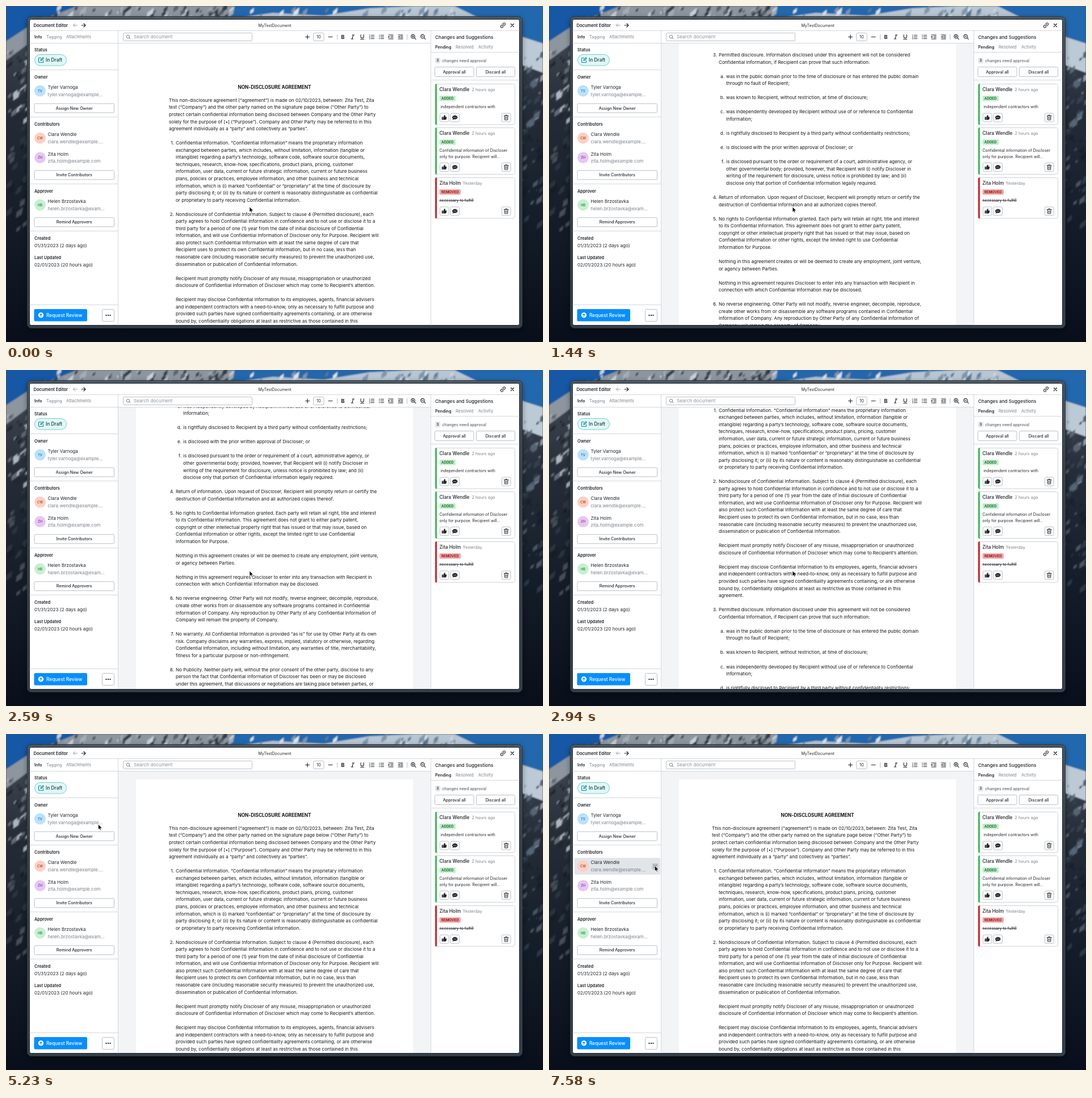
Write an HTML page that moves like this. It is 946 px wide and 592 px high and loops after 7.99 s.

```html
<!DOCTYPE html>
<html lang="en">
<head>
<meta charset="utf-8">
<title>Document Editor</title>
<style>
  html, body { margin: 0; width: 100%; height: 100%; overflow: hidden; background: #0b1424; }
  svg { display: block; width: 946px; height: 592px; font-family: Inter, "Open Sans", sans-serif; }
</style>
</head>
<body>
<svg id="stage" viewBox="0 0 946 592"></svg>
<script>
const LOOP = 7990, PITCH = 12.55;
const INK = '#20252b', GREY = '#7a828b', LINE = '#d3d7dc', EDGE = '#b9bfc6';

const agreement = `This non-disclosure agreement (“agreement”) is made on 02/10/2023, between: Zita Test, Zita
test (“Company”) and the other party named on the signature page below (“Other Party”) to
protect certain confidential information being disclosed between Company and the Other Party
solely for the purpose of [•] (“Purpose”). Company and Other Party may be referred to in this
agreement individually as a “party” and collectively as “parties”.

1. Confidential Information. “Confidential Information” means the proprietary information
exchanged between parties, which includes, without limitation, information (tangible or
intangible) regarding a party’s technology, software code, software source documents,
techniques, research, know-how, specifications, product plans, pricing, customer
information, user data, current or future strategic information, current or future business
plans, policies or practices, employee information, and other business and technical
information, which is (i) marked “confidential” or “proprietary” at the time of disclosure by
party disclosing it; or (ii) by its nature or content is reasonably distinguishable as confidential
or proprietary to party receiving Confidential Information.

2. Nondisclosure of Confidential Information. Subject to clause 4 (Permitted disclosure), each
party agrees to hold Confidential Information in confidence and to not use or disclose it to a
third party for a period of one (1) year from the date of initial disclosure of Confidential
Information, and will use Confidential Information of Discloser only for Purpose. Recipient will
also protect such Confidential Information with at least the same degree of care that
Recipient uses to protect its own Confidential Information, but in no case, less than
reasonable care (including reasonable security measures) to prevent the unauthorized use,
dissemination or publication of Confidential Information.

Recipient must promptly notify Discloser of any misuse, misappropriation or unauthorized
disclosure of Confidential Information of Discloser which may come to Recipient’s attention.

Recipient may disclose Confidential Information to its employees, agents, financial advisers
and independent contractors with a need-to-know, only as necessary to fulfill purpose and
provided such parties have signed confidentiality agreements containing, or are otherwise
bound by, confidentiality obligations at least as restrictive as those contained in this
agreement.

3. Permitted disclosure. Information disclosed under this agreement will not be considered
Confidential Information, if Recipient can prove that such information:

a. was in the public domain prior to the time of disclosure or has entered the public domain
through no fault of Recipient;

b. was known to Recipient, without restriction, at time of disclosure;

c. was independently developed by Recipient without use of or reference to Confidential
Information;

d. is rightfully disclosed to Recipient by a third party without confidentiality restrictions;

e. is disclosed with the prior written approval of Discloser; or

f. is disclosed pursuant to the order or requirement of a court, administrative agency, or
other governmental body; provided, however, that Recipient will (i) notify Discloser in
writing of the requirement for disclosure, unless notice is prohibited by law; and (ii)
disclose only that portion of Confidential Information legally required.

4. Return of information. Upon request of Discloser, Recipient will promptly return or certify the
destruction of Confidential Information and all authorized copies thereof.

5. No rights to Confidential Information granted. Each party will retain all right, title and interest
to its Confidential Information. This agreement does not grant to either party patent,
copyright or other intellectual property right that has issued or that may issue, based on
Confidential Information or other rights, except the limited right to use Confidential
Information for Purpose.

Nothing in this agreement creates or will be deemed to create any employment, joint venture,
or agency between Parties.

Nothing in this agreement requires Discloser to enter into any transaction with Recipient in
connection with which Confidential Information may be disclosed.

6. No reverse engineering. Other Party will not modify, reverse engineer, decompile, reproduce,
create other works from or disassemble any software programs contained in Confidential
Information of Company. Any reproduction by Other Party of any Confidential Information of
Company will remain the property of Company.

7. No warranty. All Confidential Information is provided “as is” for use by Other Party at its own
risk. Company disclaims any warranties, express, implied, statutory or otherwise, regarding
Confidential Information, including without limitation, any warranties of title, merchantability,
fitness for a particular purpose or non-infringement.

8. No Publicity. Neither party will, without the prior consent of the other party, disclose to any
person the fact that Confidential Information of Discloser has been or may be disclosed
under this agreement, that discussions or negotiations are taking place between parties, or
any of the terms, conditions, status or other facts with respect to this agreement, except as
required by law.

9. Term. This agreement will terminate one (1) year after the date of this agreement, or may be
terminated by either party at any time upon thirty (30) days written notice to other party.
Each Party’s obligations under this agreement will survive termination of this agreement and
will be binding upon such party’s heirs, successors, and assigns.

10. Remedies. Recipient agrees that due to the unique nature of Discloser’s Confidential
Information any breach of this agreement may result in irreparable damage to Discloser for
which monetary damages would be an inadequate remedy. Therefore, in addition to any other
remedies that may be available, in law, in equity or otherwise, Discloser will be entitled to
obtain injunctive relief against the threatened breach of this agreement or the continuation of
any such breach by Recipient.

11. Governing law. This agreement will be governed by the laws of the State of Norvania, without
giving effect to principles of conflicts of law.

12. Final provisions.

a. This agreement constitutes the entire agreement between parties with respect to its
subject matter and supersedes all prior agreements between parties regarding the same
subject matter.

b. This agreement can be modified only by a written amendment signed by parties.

c. Failure to enforce any provisions of this agreement will not constitute a waiver.

d. If any provision is unenforceable, the other provisions will remain effective.

e. Parties may execute this agreement in counterparts, which taken together will constitute
one instrument.

f. Neither party may assign this agreement without the written consent of the other party.`;

// y is the vertical middle of the capitals
const text = (x, y, size, str, fill = INK, weight = 400, anchor = 'start', more = '') =>
  `<text x="${x}" y="${y + size * .36}" font-size="${size}" fill="${fill}" font-weight="${weight}" text-anchor="${anchor}" ${more}>${str}</text>`;
const rect = (x, y, w, h, fill, stroke = 'none', r = 0, more = '') =>
  `<rect x="${x}" y="${y}" width="${w}" height="${h}" rx="${r}" fill="${fill}" stroke="${stroke}" ${more}/>`;
const path = (d, stroke = INK, width = 1, fill = 'none', more = '') =>
  `<path d="${d}" stroke="${stroke}" stroke-width="${width}" fill="${fill}" stroke-linecap="round" stroke-linejoin="round" ${more}/>`;
const circle = (x, y, r, fill, more = '') => `<circle cx="${x}" cy="${y}" r="${r}" fill="${fill}" ${more}/>`;
const at = (x, y, inner) => `<g transform="translate(${x} ${y})">${inner}</g>`;
const button = (x, y, w, h, label, id = '') =>
  rect(x, y, w, h, '#fff', EDGE, 1.8, id && `id="${id}"`) + text(x + w / 2, y + h / 2, 7.15, label, INK, 500, 'middle');
const hline = (x1, x2, y) => path(`M${x1} ${y}H${x2}`, LINE);

function backdrop() {
  const shape = (d, fill) => `<path d="${d}" fill="${fill}"/>`;
  let seed = 7;
  const random = () => (seed = seed * 16807 % 2147483647) / 2147483647;
  // slanted slivers of rock and snow inside a box
  const shards = (count, x, y, w, h, colors) => Array.from({ length: count }, () => {
    const px = x + random() * w, py = y + random() * h, s = 3 + random() * 9;
    return shape(`M${px} ${py}l${s} ${-s * .8}l${-s * .2} ${s * 1.1}l${-s * .9} ${s * .6}Z`, colors[Math.floor(random() * colors.length)]);
  }).join('');
  return `<defs>
    <linearGradient id="rock" x2="0" y2="1"><stop stop-color="#4a535d"/><stop offset=".3" stop-color="#252d38"/>
      <stop offset=".65" stop-color="#141c28"/><stop offset="1" stop-color="#080f1b"/></linearGradient>
    <linearGradient id="frame" x2="0" y2="1"><stop stop-color="#4b5862"/><stop offset=".3" stop-color="#3d464e"/><stop offset="1" stop-color="#39434e"/></linearGradient>
    <filter id="soft"><feGaussianBlur stdDeviation=".8"/></filter>
    <filter id="shade"><feGaussianBlur stdDeviation="5"/></filter>
    <clipPath id="view"><rect x="198" y="66" width="550" height="496"/></clipPath></defs>`
    + rect(0, 0, 946, 592, 'url(#rock)') + `<g filter="url(#soft)">`
    + shape('M0 0H130L70 22L38 40L0 62Z', '#1559a6')
    + shape('M0 62L40 36L75 20L125 0H400L420 22H60L38 68L0 96Z', '#8d969f')
    + shape('M400 0H946V66L908 54V22H395Z', '#2167ae')
    + shape('M400 22L470 12L560 17L640 4L720 0H790L835 22Z', '#b8c6d3')
    + shape('M908 54L946 66V118L908 104Z', '#bccad6')
    + shards(70, 65, 2, 330, 22, ['#c9d3dc', '#5b646d', '#333d48', '#a3adb5'])
    + shards(28, 430, 6, 370, 18, ['#dbe4ec', '#8096aa', '#5b7793'])
    + shards(36, 0, 75, 40, 130, ['#20262d', '#656b72', '#aeb6bd', '#343b43'])
    + shards(34, 0, 205, 40, 190, ['#161c24', '#464e57', '#2c343e'])
    + shards(26, 908, 80, 40, 130, ['#34414f', '#8b9aa8', '#566574'])
    + shards(34, 908, 200, 40, 190, ['#161f2b', '#4a5663', '#2c3846']) + `</g>`
    + rect(37, 21, 873, 551, '#000', 'none', 9, 'opacity=".38" filter="url(#shade)"')
    + rect(37.5, 18.5, 872, 549, 'url(#frame)', '#2b343c', 7, 'fill-opacity=".93"')
    + rect(41.5, 23.5, 863, 539, '#fff', '#1d242b', 3);
}

function documentView() {
  let indent = 287;
  const lines = agreement.split('\n').map((line, i) => {
    const y = 166 + i * PITCH;
    const [, mark, body] = line.match(/^(\d+\.|[a-f]\.) (.*)/) || [];
    if (!mark) return line && text(indent, y, 8.13, line, '#15171a');
    indent = /\d/.test(mark) ? 299 : 312;
    return text(indent - 3, y, 8.13, mark, '#15171a', 400, 'end') + text(indent, y, 8.13, body, '#15171a');
  }).join('');
  return `<g clip-path="url(#view)">` + rect(198, 66, 550, 496, '#f2f4f6', 'none', 0, 'id="desk"')
    + `<g id="scroll">` + rect(229, 80, 488, 1800, '#fff')
    + text(473, 143.5, 8.25, 'NON-DISCLOSURE AGREEMENT', '#15171a', 700, 'middle') + lines + `</g></g>`;
}

function titleBar() {
  return text(48.5, 34, 7.5, 'Document Editor', INK, 600) + text(473.5, 34, 7, 'MyTestDocument', INK, 400, 'middle')
    + path('M125.500 34H118.500M121.500 31L118.500 34L121.500 37', '#9aa1a8')
    + path('M133 34H140M137 31L140 34L137 37', INK, 1.2)
    + at(875.5, 34, `<g transform="rotate(-45)">` + path('M-1 -2H-3A2 2 0 0 0 -3 2H-1M1 -2H3A2 2 0 0 1 3 2H1M-2 0H2', INK, 1.1) + `</g>`)
    + path('M889.500 31.500L894.500 36.500M894.500 31.500L889.500 36.500', INK, 1.3) + hline(42, 904, 43.5);
}

function toolbar() {
  const list = (x, marks) => at(x, 54.5, path('M-1.500 -3H4M-1.500 0H4M-1.500 3H4', INK, 1) + marks);
  const dots = [-3, 0, 3].map(y => circle(-3.8, y, .8, INK)).join('');
  const digits = [1, 2, 3].map((n, i) => text(-5, i * 3 - 3, 3.3, n, INK, 600)).join('');
  const dent = (x, d) => at(x, 54.5, path('M-4 -3.500H4M0 -1.200H4M0 1.200H4M-4 3.500H4', INK, 1) + path(d, INK, .5, INK));
  const zoom = (x, d) => at(x, 54, circle(-.5, -.3, 3.3, 'none', `stroke="${INK}" stroke-width="1.1"`) + path('M2 2.200L4.500 4.700' + d, INK, 1.1));
  return rect(206.5, 47.5, 227, 14, '#fff', EDGE, 1.8)
    + circle(215, 54, 2.7, 'none', `stroke="${GREY}"`) + path('M217 56L219 58', GREY)
    + text(225, 54.5, 8.2, 'Search document', '#8b929a')
    + path('M527.500 54.500H534.500M531 51V58M568 54.500H575', INK, 1.2)
    + rect(541.5, 47.5, 18.5, 14, '#fff', EDGE, 1.8) + text(550.8, 54.5, 7.5, '10', INK, 400, 'middle')
    + path('M583.500 50V59M706.500 50V59', '#a8aeb5', .8)
    + text(593.5, 54.5, 9.5, 'B', INK, 700, 'middle')
    + path('M610 51H613.500M608 58H611.500M611.800 51L609.700 58', INK, 1.1)
    + path('M625 50.500V54A2.600 2.600 0 0 0 630.200 54V50.500M624.500 58.700H630.700', INK, 1.1)
    + list(644.5, digits) + list(661.5, dots)
    + dent(678, 'M-4 -1.500L-2 0L-4 1.500Z') + dent(695, 'M-2 -1.500L-4 0L-2 1.500Z')
    + zoom(717.5, 'M-2 -.3H1M-.5 -1.800V1.200') + zoom(734.5, 'M-2 -.3H1') + hline(198, 748, 65.5);
}

function person(y, name, mail, initials, tint, ink, row) {
  const hover = row ? `<g id="${row}" visibility="hidden">` + rect(45, y - 14.5, 151, 29.5, '#e1e4e9', 'none', 2)
    + rect(181.5, y - 5, 11, 11, '#c4c9d0', 'none', 1.5, `id="${row}Close"`)
    + path(`M184.500 ${y - 2.3}l5 5m0 -5l-5 5`, '#4c545d', .9) + `</g>` : '';
  return hover + circle(60, y, 10, tint) + text(60, y, 5.8, initials, ink, 500, 'middle')
    + text(73.5, y - 6.5, 8.1, name) + text(73.5, y + 6.2, 8.06, mail, GREY);
}

function leftPanel() {
  const heading = (y, s) => text(50, y, 7.35, s, INK, 600);
  return path('M197.500 43V562', LINE)
    + text(50, 54.5, 7.2, 'Info', INK, 600) + text(71, 54.5, 7.3, 'Tagging', GREY) + text(106, 54.5, 7.4, 'Attachments', GREY)
    + [65.5, 112.5, 195.5, 313.5, 396.5, 526.5].map(y => hline(42, 197, y)).join('')
    + heading(77.5, 'Status') + rect(50.5, 85.5, 56, 19.5, '#e0f8f8', '#76cbcd', 9.7)
    + path('M61.500 91.500H58.500Q57.500 91.500 57.500 92.500V98.500Q57.500 99.500 58.500 99.500H64.500Q65.500 99.500 65.500 98.500V96M61 96.200L61.300 94.500L65 90.800L66.400 92.200L62.700 95.900Z', '#128a91', 1.1)
    + text(70, 95.3, 8.35, 'In Draft', '#1d3c42', 500)
    + heading(125, 'Owner') + person(149.5, 'Tyler Varnoga', 'tyler.varnoga@example...', 'TV', '#b9e2ff', '#24638f')
    + button(50, 172, 140.5, 16, 'Assign New Owner', 'assign')
    + heading(208, 'Contributors')
    + person(232.7, 'Clara Wendle', 'clara.wendle@example....', 'CW', '#ffcfc1', '#93452d', 'first')
    + person(267.3, 'Zita Holm', 'zita.holm@example.com', 'ZH', '#e8c6f4', '#6d3b80', 'second')
    + button(50, 289.8, 140.5, 16, 'Invite Contributors')
    + heading(326, 'Approver') + person(350.5, 'Helen Brzostavka', 'helen.brzostavka@exam...', 'HB', '#c5f1cf', '#2f7442')
    + button(50, 372.8, 140.5, 16, 'Remind Approvers')
    + heading(409, 'Created') + text(50, 422.5, 8.1, '01/31/2023 (2 days ago)')
    + heading(443, 'Last Updated') + text(50, 456.5, 8.1, '02/01/2023 (20 hours ago)')
    + rect(49.5, 534, 93.5, 21.5, '#078eff', 'none', 2)
    + circle(61.5, 544.8, 4.7, '#fff') + path('M61.500 547.300V542.500M59.500 544.400L61.500 542.400L63.500 544.400', '#078eff', 1.1)
    + text(71, 544.8, 8.35, 'Request Review', '#fff', 500)
    + rect(169.5, 534.5, 21, 21, '#fff', EDGE, 2) + [176.5, 180, 183.5].map(x => circle(x, 545, 1.15, INK)).join('');
}

function card(y, h, tint, name, when, tag, tagWidth, tagFill, tagInk, body, more) {
  const mid = y + h - 13;
  const box = x => rect(x, mid - 7.5, 15.5, 15, '#fff', EDGE, 1.8);
  return rect(756.5, y + .5, 140, h - 1, '#fff', '#ccd1d6', 3)
    + path(`M759 ${y}H758.500Q756 ${y} 756 ${y + 2.5}V${y + h - 2.5}Q756 ${y + h} 758.500 ${y + h}H759Z`, 'none', 0, tint)
    + text(763.5, y + 10.3, 8.3, name, INK, 500) + text(763.5 + (name.length > 10 ? 57 : 41), y + 10.3, 7.3, when, GREY)
    + rect(763.5, y + 21, tagWidth, 9.5, tagFill, 'none', 1.5)
    + text(763.5 + tagWidth / 2, y + 25.8, 6.2, tag, tagInk, 600, 'middle')
    + body.map((s, i) => text(s.startsWith('ind') ? 765.5 : 763.5, y + 40.5 + i * 11, 6.95, s, INK, 400, 'start', more)).join('')
    + box(764.5) + box(783) + box(873.5)
    + at(772, mid, path('M-3.800 -.8H-2.200V3.800H-3.800ZM-1.200 -.8L.3 -4Q1.900 -4.300 1.700 -2.600L1.300 -1H3.200Q4.200 -.9 4 .2L3.300 3Q3 3.800 2.200 3.800H-1.200Z', INK, .5, INK))
    + at(790.8, mid, path('M0 -3.600C6 -3.600 6 3 0 3Q-1 3 -1.800 2.800L-4 3.900L-3.300 2C-6 -.2 -4 -3.600 0 -3.600Z', INK, .4, INK)
      + [-2, 0, 2].map(x => circle(x, -.2, .65, '#fff')).join(''))
    + at(881.2, mid, path('M-4 -3H4M-1.300 -3V-4.300H1.300V-3M-3 -3L-2.600 4.300H2.600L3 -3M-1.100 -1V2.500M1.100 -1V2.500', INK, .9));
}

function rightPanel() {
  const green = ['ADDED', 28.5, '#bcefc6', '#1d5a2e'];
  return path('M748.500 43V562', LINE) + text(756, 55, 8.2, 'Changes and Suggestions', INK, 500)
    + text(756, 72.3, 7.2, 'Pending', INK, 600) + text(792, 72.3, 7.35, 'Resolved', GREY) + text(832, 72.3, 7.35, 'Activity', GREY)
    + hline(749, 904, 81.5) + hline(749, 904, 130.5)
    + rect(756, 91, 9, 10, '#e2e5e9', 'none', 2) + text(760.5, 96, 6.8, '3', INK, 500, 'middle')
    + text(768.3, 96, 7.03, 'changes need approval', '#444b53')
    + button(755.5, 107.5, 68.5, 17, 'Approval all') + button(828.5, 107.5, 68, 17, 'Discard all')
    + card(137, 72.5, '#35bd55', 'Clara Wendle', '2 hours ago', ...green, ['independent contractors with'])
    + card(214, 83, '#35bd55', 'Clara Wendle', '2 hours ago', ...green, ['Confidential information of Discloser', 'only for purpose. Recipient will...'])
    + card(302, 72.5, '#d81f26', 'Zita Holm', 'Yesterday', 'REMOVED', 37.5, '#f9a3a3', '#6b1515', ['necessary to fulfill'], 'text-decoration="line-through"');
}

const $ = id => document.getElementById(id);
$('stage').innerHTML = backdrop() + documentView() + titleBar() + toolbar() + leftPanel() + rightPanel()
  + `<g id="cursor">` + path('M0 0V9.200L2.100 7.300L3.500 10.300L5 9.600L3.700 6.700H6.600Z', '#fff', .7, '#000') + `</g>`;

// start, end, number of steps, from, to, ease-out power
const scrolls = [
  [720, 1500, 13, 0, 509.6, 2],
  [1550, 2270, 13, 509.6, 1080.2, 2],
  [2390, 3090, 12, 1080.2, 0, 1.332],
];
// start, end, number of steps, bend point, end point
const rest = [429, 354];
const moves = [
  [3620, 3970, 7, [372, 235], [305.5, 138.5]],
  [4210, 5000, 14, [215, 47], [164, 130]],
  [5060, 5400, 7, [164, 155], [160, 177]],
  [5820, 6340, 10, [160, 225], [166.8, 269]],
  [6760, 7110, 7, [167, 245], [171, 228]],
  [7340, 7580, 5, [179, 229], [186.3, 232.5]],
];

function progress(t, start, end, steps) {
  if (t < start) return 0;
  const step = (end - start) / (steps - 1);
  return Math.min(1, (Math.floor((t - start) / step + 1e-6) + 1) / steps);
}

function scrollAt(t) {
  let y = 0;
  for (const [start, end, steps, from, to, power] of scrolls)
    if (t >= start) y = from + (to - from) * (1 - (1 - progress(t, start, end, steps)) ** power);
  return y;
}

function cursorAt(t) {
  let p = rest;
  for (const [start, end, steps, bend, to] of moves) {
    if (t < start) break;
    const u = progress(t, start, end, steps), k = u * u * (3 - 2 * u);
    p = p.map((v, i) => (1 - k) ** 2 * v + 2 * k * (1 - k) * bend[i] + k * k * to[i]);
  }
  return p;
}

const show = (id, on) => $(id).setAttribute('visibility', on ? 'visible' : 'hidden');

function draw(now) {
  const t = now % LOOP, [x, y] = cursorAt(t);
  const over = (top, bottom) => x < 196 && y >= top && y <= bottom;
  $('scroll').setAttribute('transform', `translate(0 ${-scrollAt(t)})`);
  $('cursor').setAttribute('transform', `translate(${x} ${y})`);
  $('desk').setAttribute('fill', t < 720 ? '#fff' : '#f2f4f6');
  $('assign').setAttribute('fill', over(172, 188) ? '#eceef1' : '#fff');
  for (const [row, top] of [['first', 218], ['second', 253]]) {
    const on = over(top, top + 29.5);
    show(row, on);
    show(row + 'Close', on && x > 181);
  }
  requestAnimationFrame(draw);
}
requestAnimationFrame(draw);
</script>
</body>
</html>
```
